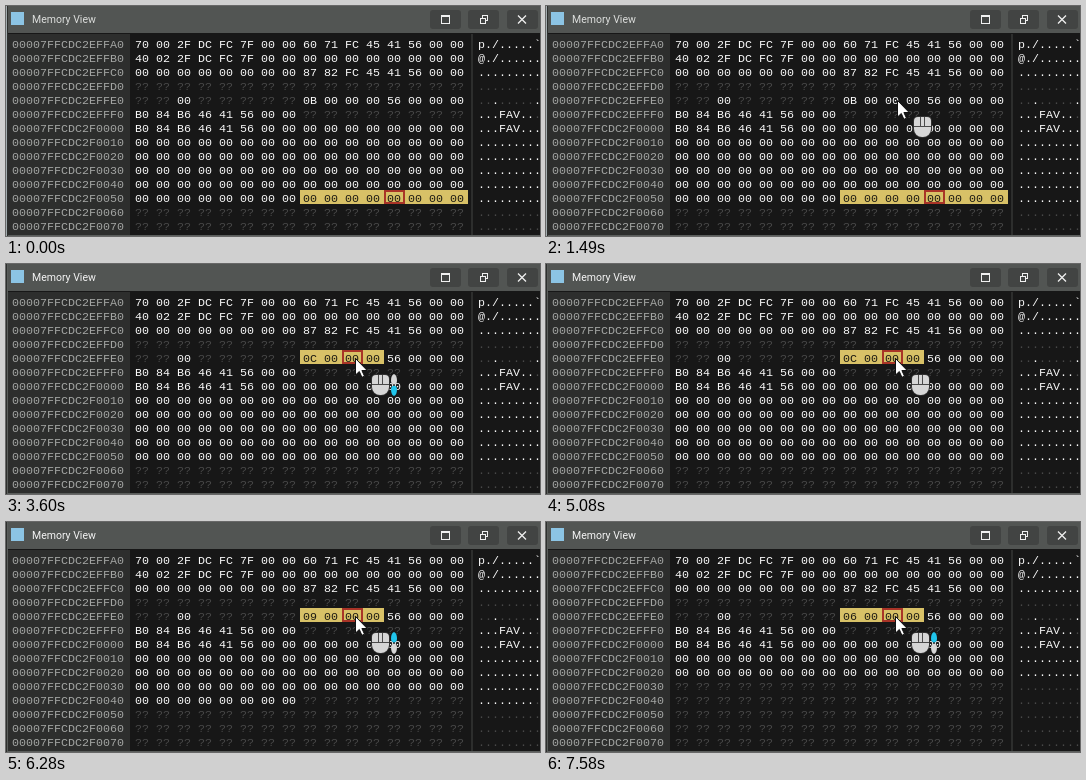
Write an HTML page with a canvas that moves like this. It is 534 px wide and 230 px high and loops after 8000 ms.

```html
<!DOCTYPE html>
<html lang="en">
<head>
<meta charset="utf-8">
<title>Memory View</title>
<style>
  html, body { margin: 0; width: 100%; height: 100%; overflow: hidden; background: #171717; }
  canvas { display: block; width: 534px; height: 230px; }
</style>
</head>
<body>
<canvas id="stage" width="534" height="230"></canvas>
<script>
const ctx = document.getElementById('stage').getContext('2d');
const LOOP = 8000;
const ROWS = 14, ROW_H = 14, TOP = 30, CELL = 21, HEX_X = 126, ASCII_X = 472;
const MONO = '11.667px "Liberation Mono", monospace';
const COLOR = {
  title: '#525553', button: '#424443', icon: '#f0f0f0', frame: '#5a5d5b',
  gutter: '#2d2e2d', panel: '#171717', address: '#a3a5a3', byte: '#fafafa', unknown: '#484848',
  gold: '#d8c167', blue: '#1f8ae4', red: '#a93427', dark: '#1c1a12',
  mouse: '#d6d6d6', seam: '#4a4a4a', cyan: '#20c5ec'
};
const ZEROS = n => Array(n).fill('00');
const UNKNOWN = n => Array(n).fill('??');

// Timelines: [start, value], the last started entry holds.
const counter = [[0, 11], [2660, 12], [5680, 11], [5910, 10], [6160, 9], [7030, 8], [7280, 7], [7520, 6]];
const slots = [[0, 12], [5740, 11], [5970, 10], [6280, 9], [7090, 8], [7340, 7], [7580, 6]];
const wheel = [[0, ''], [2660, 'down'], [3160, ''], [3530, 'down'], [5080, ''], [5580, 'up'], [6780, ''], [6900, 'up']];
const CLICK = 1700, RELEASE = 1870, SELECT = 2660, COMMIT = 3600;

const at = (t, track) => track.reduce((v, [start, value]) => t >= start ? value : v, track[0][1]);
const clamp = v => Math.max(0, Math.min(1, v));
const mix = (a, b, p) => a + (b - a) * p;

function rect(x, y, w, h, color) {
  ctx.fillStyle = color;
  ctx.fillRect(x, y, w, h);
}

function rounded(x, y, w, h, radii, color) {
  ctx.beginPath();
  ctx.roundRect(x, y, w, h, radii);
  ctx.fillStyle = color;
  ctx.fill();
}

function text(str, x, y, color) {
  ctx.fillStyle = color;
  ctx.fillText(str, x, y);
}

function rowBytes(row, t) {
  const block = 'B0 84 B6 46 41 56 00 00'.split(' ');
  const count = at(t, counter).toString(16).toUpperCase().padStart(2, '0');
  switch (row) {
    case 0: return '70 00 2F DC FC 7F 00 00 60 71 FC 45 41 56 00 00'.split(' ');
    case 1: return ['40', '02', '2F', 'DC', 'FC', '7F', ...ZEROS(10)];
    case 2: return [...ZEROS(8), '87', '82', 'FC', '45', '41', '56', '00', '00'];
    case 3: return UNKNOWN(16);
    case 4: return [...UNKNOWN(2), '00', ...UNKNOWN(5), count, ...ZEROS(3), '56', ...ZEROS(3)];
    case 5: return [...block, ...UNKNOWN(8)];
  }
  const used = at(t, slots);
  const half = i => (row - 6) * 2 + i < used ? ZEROS(8) : UNKNOWN(8);
  return row === 6 ? [...block, ...half(1)] : [...half(0), ...half(1)];
}

function asciiOf(hex) {
  const code = parseInt(hex, 16);
  return code >= 32 && code < 127 ? String.fromCharCode(code) : '.';
}

function selection(t) {
  if (t < SELECT) return { row: 11, from: 8, to: 16, color: COLOR.gold, ink: COLOR.dark };
  const fresh = t < COMMIT;
  return { row: 4, from: 8, to: 12, color: fresh ? COLOR.blue : COLOR.gold, ink: fresh ? '#fff' : COLOR.dark };
}

function drawTitle(active) {
  rect(0, 0, 534, 27, COLOR.title);
  rect(0, 27, 534, 3, COLOR.panel);
  rect(5, 6, 13, 13, '#8cc4e4');
  ctx.font = '10.5px Roboto, sans-serif';
  text('Memory View', 26, 17, active ? '#f4f4f4' : '#dcdedc');

  for (const x of [424, 462, 501]) rounded(x, 4, 31, 19, 3, COLOR.button);
  ctx.strokeStyle = COLOR.icon;
  ctx.lineWidth = 1;
  ctx.strokeRect(435.5, 9.5, 8, 8);
  rect(435, 9, 9, 2, COLOR.icon);
  ctx.strokeRect(476.5, 9.5, 5, 5);
  rect(474, 12, 6, 6, COLOR.button);
  ctx.strokeRect(474.5, 12.5, 5, 5);
  ctx.lineWidth = 1.3;
  ctx.beginPath();
  ctx.moveTo(512, 9.5); ctx.lineTo(520, 17.5);
  ctx.moveTo(520, 9.5); ctx.lineTo(512, 17.5);
  ctx.stroke();
}

function drawMemory(t) {
  rect(0, TOP, 534, 200, COLOR.panel);
  rect(0, TOP - 2, 124, 202, COLOR.gutter);
  rect(465, TOP - 2, 2, 202, COLOR.gutter);
  ctx.font = MONO;
  const sel = selection(t);
  rect(HEX_X + sel.from * CELL, TOP + sel.row * ROW_H, (sel.to - sel.from) * CELL, ROW_H, sel.color);

  for (let row = 0; row < ROWS; row++) {
    const y = TOP + row * ROW_H + 12;
    const address = 0xDC2EFFA0 + row * 16;
    text('00007FFC' + address.toString(16).toUpperCase(), 6, y, COLOR.address);
    rowBytes(row, t).forEach((hex, col) => {
      const color = hex === '??' ? COLOR.unknown : COLOR.byte;
      const picked = row === sel.row && col >= sel.from && col < sel.to;
      text(hex, HEX_X + col * CELL + 3, y, picked ? sel.ink : color);
      if (col < 9) text(asciiOf(hex), ASCII_X + col * 7, y, color);
    });
  }

  const [row, col] = t < CLICK ? [11, 12] : [4, 10];
  ctx.strokeStyle = COLOR.red;
  ctx.lineWidth = 2;
  ctx.strokeRect(HEX_X + col * CELL + 1, TOP + row * ROW_H + 1, CELL - 2, ROW_H - 2);
}

function pointer(t) {
  if (t < 330) return [455, 226];
  if (t < 1180) {
    const step = 790 / 13;
    const s = 330 + Math.floor((t - 330) / step) * step;
    const p = clamp((s - 190) / 685), ease = 1 - (1 - p) ** 2;
    const drift = clamp((s - 890) / 230);
    return [mix(455, 346, ease) - drift, mix(226, 86, ease) + 3 * drift];
  }
  if (t < 1550) {
    const p = clamp((Math.floor((t - 1180) / 60) + 1) / 3);
    return [mix(345, 351, p), mix(89, 94, p)];
  }
  return [t < 1610 ? 350 : 349, 94];
}

function drawMouse(x, y, pressed, scroll) {
  ctx.save();
  ctx.translate(x, y);
  rounded(0, 0, 19, 22, [5, 5, 9, 9], '#303030');
  rounded(1, 1, 17, 20, [4, 4, 8, 8], COLOR.mouse);
  ctx.clip();
  if (pressed) rect(0, 0, 7, 10, COLOR.cyan);
  rect(0, 10, 19, 1, COLOR.seam);
  rect(7, 0, 1, 10, COLOR.seam);
  rect(11, 0, 1, 10, COLOR.seam);
  ctx.restore();
  if (scroll) {
    drawArrow(x + 23, y, 1, scroll === 'up');
    drawArrow(x + 23, y + 22, -1, scroll === 'down');
  }
}

function drawArrow(x, y, dir, lit) {
  ctx.save();
  ctx.translate(x, y);
  ctx.scale(1, dir);
  ctx.beginPath();
  ctx.moveTo(0, 0);
  ctx.bezierCurveTo(2.5, 1, 3, 4, 3, 7);
  ctx.bezierCurveTo(3, 11.5, -3, 11.5, -3, 7);
  ctx.bezierCurveTo(-3, 4, -2.5, 1, 0, 0);
  ctx.fillStyle = lit ? COLOR.cyan : COLOR.mouse;
  ctx.fill();
  ctx.restore();
}

function drawCursor(x, y) {
  const outline = [[0, 0], [0, 16.5], [3.8, 13], [6.4, 18.8], [9, 17.7], [6.4, 12], [11.7, 12]];
  ctx.beginPath();
  outline.forEach(([dx, dy]) => ctx.lineTo(x + dx + .5, y + dy + .5));
  ctx.closePath();
  ctx.fillStyle = '#fff';
  ctx.fill();
  ctx.strokeStyle = '#111';
  ctx.lineWidth = 1;
  ctx.stroke();
}

function drawFrame(active) {
  rect(0, 229, 534, 1, COLOR.frame);
  rect(0, 0, 1, 230, active ? '#2e302e' : '#a4adb0');
  rect(1, 0, 1, 230, active ? COLOR.frame : '#2e302e');
}

function draw(t) {
  const active = t >= CLICK;
  drawTitle(active);
  drawMemory(t);
  drawFrame(active);
  if (t < 190) return;
  const [x, y] = pointer(t).map(Math.round);
  drawMouse(x + 16, y + 16, t >= CLICK && t < RELEASE, at(t, wheel));
  drawCursor(x, y);
}

function frame() {
  draw(performance.now() % LOOP);
  requestAnimationFrame(frame);
}
frame();
</script>
</body>
</html>
```
